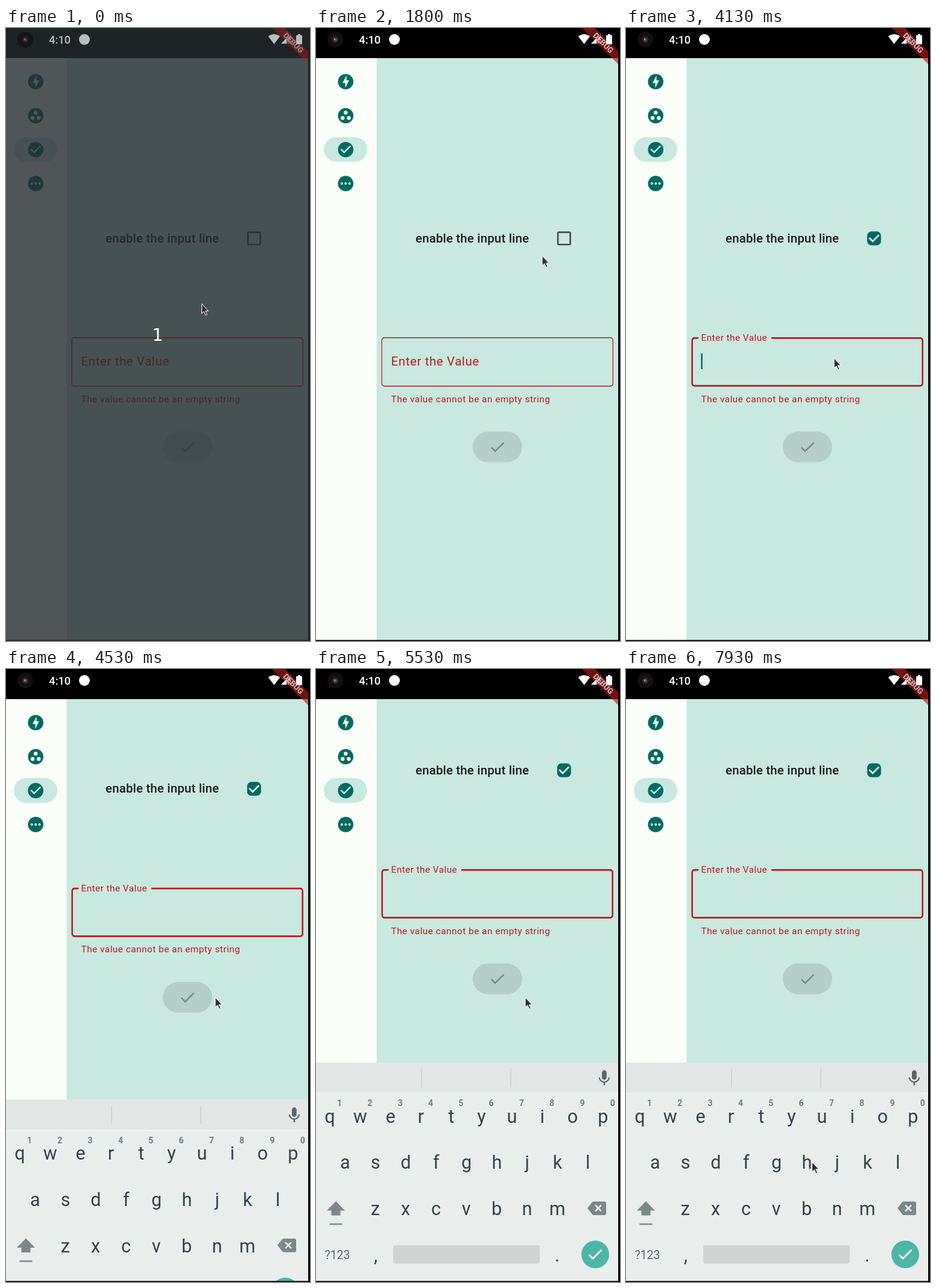
An HTML page for the animation above (8 s loop, 504x1017 px).

```html
<!DOCTYPE html>
<html lang="en">
<head>
<meta charset="utf-8">
<title>Input form demo</title>
<style>
  html, body { margin: 0; width: 100%; height: 100%; overflow: hidden; background: #000; }
  svg { display: block; width: 504px; height: 1017px; font-family: Roboto, sans-serif; }
  .red { fill: #ba1a1a; }
  .teal { fill: #006a60; }
  .mint { fill: #c9e8e0; }
  .rail { fill: #fafef9; }
  .small { font-size: 15.3px; letter-spacing: .51px; }
  .key { font-size: 30.5px; fill: #33434a; text-anchor: middle; }
  .hint { font-size: 14px; font-weight: 700; fill: #727d80; text-anchor: middle; }
  .grey { fill: #7b8789; }
</style>
</head>
<body>
<svg viewBox="0 0 504 1017">
  <defs>
    <path id="tick" d="M9 16.17 4.83 12l-1.42 1.41L9 19 21 7l-1.41-1.41z"/>
  </defs>

  <rect width="504" height="1017"/>
  <rect class="mint" x="100" y="50" width="401" height="966"/>
  <rect class="rail" y="50" width="100.5" height="966"/>

  <!-- navigation rail -->
  <rect class="mint" x="13" y="181" width="72" height="41" rx="20.5"/>
  <g class="teal">
    <circle cx="49.2" cy="89" r="12.8"/>
    <circle cx="49.2" cy="145.5" r="12.8"/>
    <circle cx="49.2" cy="201.7" r="12.8"/>
    <circle cx="49.2" cy="258" r="12.8"/>
  </g>
  <g class="rail">
    <path transform="translate(33.9 73.7) scale(1.276)" d="M11.48 20v-6.26H8L13 4v6.26h3.35z"/>
    <circle cx="49.2" cy="140.4" r="3.2"/>
    <circle cx="44.1" cy="149.3" r="3.2"/>
    <circle cx="54.3" cy="149.3" r="3.2"/>
    <circle cx="42.8" cy="258" r="1.9"/>
    <circle cx="49.2" cy="258" r="1.9"/>
    <circle cx="55.6" cy="258" r="1.9"/>
  </g>
  <path class="mint" transform="translate(33.9 186.4) scale(1.276)" d="M10 17 5 12l1.41-1.41L10 14.17l7.59-7.59L19 8z"/>

  <!-- form -->
  <g id="form">
    <text x="165" y="355.5" font-size="20.4" font-weight="500" letter-spacing=".19" fill="#191c1b">enable the input line</text>
    <rect id="box" rx="1.2"/>
    <path id="boxTick" d="M403.2 348.1 409 353.9 419.3 343.5" pathLength="1" stroke-dasharray="1 2" fill="none" stroke="#fff" stroke-width="2.55"/>
    <path id="border" fill="none" stroke="#ba1a1a"/>
    <text id="label" class="red" font-size="20.4" letter-spacing=".64">Enter the Value</text>
    <rect id="caret" class="teal" x="124.4" y="540" width="2.5" height="26"/>
    <text class="red small" x="124.5" y="620.7">The value cannot be an empty string</text>
    <g fill="#191c1b">
      <rect x="259.8" y="669.5" width="82" height="51" rx="25.5" opacity=".12"/>
      <use href="#tick" transform="translate(285.6 679.7) scale(1.276)" opacity=".38"/>
    </g>
  </g>

  <!-- on-screen keyboard, drawn at its resting place -->
  <g id="keyboard">
    <rect y="653" width="501" height="364" fill="#e9eeed"/>
    <rect y="653" width="501" height="50.5" fill="#e2e6e5"/>
    <rect y="703" width="501" height="1.5" fill="#f3f6f5"/>
    <path d="M175 663v31M323 663v31" stroke="#c8cdcc" stroke-width="1.3"/>
    <path transform="translate(462.3 663.2) scale(1.3)" fill="#5a6669" d="M12 14c1.66 0 3-1.34 3-3V5c0-1.66-1.34-3-3-3S9 3.34 9 5v6c0 1.66 1.34 3 3 3zm5.3-3c0 3-2.54 5.1-5.3 5.1S6.7 14 6.7 11H5c0 3.41 2.72 6.23 6 6.72V21h2v-3.28c3.28-.48 6-3.3 6-6.72z"/>
    <g id="keys"></g>
    <path class="grey" d="M33 883 48 898.5H40.5V906.5H25.5V898.5H18ZM22.5 919.8h21v2.4h-21z"/>
    <path class="grey" d="M450 894.5 458 884.5Q459 883.5 460.5 883.5H478.5Q481 883.5 481 886V903.5Q481 906 478.5 906H460.5Q459 906 458 904.8Z"/>
    <path d="m463 889.5 10 10m0-10-10 10" stroke="#e9eeed" stroke-width="2.5"/>
    <text x="35.5" y="979" font-size="19.5" text-anchor="middle" fill="#5c696d">?123</text>
    <rect x="128" y="956" width="243" height="30.5" rx="4" fill="#d0d5d4"/>
    <circle cx="463" cy="971.3" r="23" fill="#4db6a8"/>
    <use href="#tick" transform="translate(447.4 955.7) scale(1.276)" fill="#fff"/>
  </g>

  <rect x="501" width="3" height="1017"/>
  <rect y="1015.3" width="504" height="1.7"/>

  <rect id="dim" width="504" height="1017" fill="#262c30" opacity=".8"/>

  <!-- status bar -->
  <g id="status">
    <svg width="501" height="100">
      <g transform="translate(501 0) rotate(45)">
        <rect x="-60" y="27.2" width="120" height="15.3" fill="#b71c1c" opacity=".63"/>
        <text y="39.4" text-anchor="middle" font-size="13" font-weight="700" fill="#d3bebe">DEBUG</text>
      </g>
    </svg>
    <circle cx="32" cy="19" r="13" fill="#101010"/>
    <circle cx="32" cy="19" r="5.5" fill="#2b2525"/>
    <circle cx="32" cy="19.5" r="2.8" fill="#6d4a48"/>
    <circle cx="31" cy="18.5" r="1.1" fill="#c8bcbc"/>
    <g fill="#fff">
      <text x="71.3" y="26" font-size="18.2" font-weight="500">4:10</text>
      <circle cx="130" cy="19" r="9"/>
      <path d="M434.8 14Q444.5 6.5 454.2 14L444.5 26.5Z"/>
      <path d="M472 10V26H456Z" opacity=".3"/>
      <path d="M465 17V26H456Z"/>
      <path d="M484 10h4v2h2.2q.8 0 .8.8V26.2q0 .8-.8.8h-8.4q-.8 0-.8-.8V12.8q0-.8.8-.8H484z"/>
    </g>
  </g>

  <text id="count" x="251.5" y="519" font-size="28.8" text-anchor="middle" fill="#fff" style="font-family:'DejaVu Sans',sans-serif">1</text>

  <path id="pointer" d="M.5 0V16.2L4.2 12.8 7.2 19.2 9.6 18.1 6.7 11.9H11.6Z" fill="#2e2e2e" stroke="#fff" stroke-width="1"/>
</svg>

<script>
const LOOP = 8000, FPS = 15, KEYBOARD_HEIGHT = 362;
const $ = id => document.getElementById(id);

// time, x, y of the pointer tip
const POINTER = [
  [200, 324, 457.5], [330, 319, 473], [530, 302, 528], [730, 295, 547],
  [1330, 295, 547], [1530, 319, 487], [1800, 374.5, 378], [2000, 403, 345], [2130, 409, 338],
  [2930, 409, 338], [3130, 394, 390], [3400, 357, 500], [3600, 343, 546], [3730, 344.5, 548],
  [4400, 344.5, 548], [4470, 346, 546], [4530, 346.5, 545],
  [6400, 346.5, 545], [6600, 325, 605], [6870, 220, 775], [7070, 125, 895], [7270, 85, 940],
  [7400, 125, 925], [7600, 265, 850], [7730, 330, 805], [7930, 308, 818]
];
// time, share of the finished state
const SLIDE = [[0, 0], [4470, .36], [4530, .83], [4600, .955], [4670, .993], [4730, 1]];
const CHECK = [[0, 0], [2470, .3], [2530, .75], [2600, 1]];
const FLOAT = [[0, 0], [4070, .75], [4130, 1]];

const step = (table, t) => table.filter(row => row[0] <= t).pop()[1];
const mix = (a, b, p) => a + (b - a) * p;

function pointerAt(t) {
  const i = POINTER.findIndex(row => row[0] > t);
  if (i === 0) return POINTER[0].slice(1);
  if (i < 0) return POINTER[POINTER.length - 1].slice(1);
  const a = POINTER[i - 1], b = POINTER[i], p = (t - a[0]) / (b[0] - a[0]);
  return [mix(a[1], b[1], p), mix(a[2], b[2], p)];
}

function setAttrs(id, attrs) {
  for (const name in attrs) $(id).setAttribute(name, attrs[name]);
}

function buildKeys() {
  const pitch = 50.3;
  const text = (cls, x, y, s) => `<text class="${cls}" x="${x}" y="${y}">${s}</text>`;
  const row = (chars, x, y, cls = 'key') =>
    [...chars].map((c, i) => text(cls, x + i * pitch, y, c)).join('');
  $('keys').innerHTML =
    row('1234567890', 39, 725, 'hint') +
    row('qwertyuiop', 23, 752.5) +
    row('asdfghjkl', 48.3, 829) +
    row('zxcvbnm', 98.3, 906) +
    text('key', 99, 982.5, ',') + text('key', 400, 982.5, '.');
}

// Rounded outline whose stroke lies inside the field, open on top for the label
function outline(width, gap) {
  const d = width / 2, r = 5.1 - d;
  const l = 108.4 + d, t = 513.1 + d, R = 492.9 - d, b = 594.9 - d;
  const arc = (x, y) => `A${r} ${r} 0 0 1 ${x} ${y}`;
  return `M${120.3 + gap} ${t}H${R - r}${arc(R, t + r)}V${b - r}${arc(R - r, b)}` +
    `H${l + r}${arc(l, b - r)}V${t + r}${arc(l + r, t)}H120.3`;
}

function drawCheckbox(p) {
  const fill = Math.min(1, p * 2);
  const w = mix(2.55, 11.5, fill);
  setAttrs('box', {
    x: 399.8 + w / 2, y: 337.6 + w / 2, width: 23 - w, height: 23 - w,
    fill: fill === 1 ? '#006a60' : 'none',
    stroke: p > 0 ? '#006a60' : '#3f4947', 'stroke-width': w
  });
  const drawn = Math.max(0, p * 2 - 1);
  setAttrs('boxTick', { 'stroke-dashoffset': 1 - drawn, visibility: drawn ? 'visible' : 'hidden' });
}

function drawField(t) {
  const p = step(FLOAT, t), width = p ? 2.55 : 1.276;
  setAttrs('border', { d: outline(width, 120.7 * p), 'stroke-width': width });
  setAttrs('label', { transform: `translate(124.5 ${mix(560.3, 519, p)}) scale(${mix(1, .75, p)})` });
  const blink = t >= 4100 && Math.floor(t / 500) % 2 === 0;
  setAttrs('caret', { visibility: blink ? 'visible' : 'hidden' });
}

function draw(now) {
  const tick = Math.floor((now % LOOP + 5) * FPS / 1000) % (LOOP * FPS / 1000);
  const t = Math.round(tick * 100 / FPS) * 10;
  const shown = KEYBOARD_HEIGHT * step(SLIDE, t);
  const intro = t < 70 ? 'visible' : 'hidden';
  const [x, y] = pointerAt(t);

  drawCheckbox(step(CHECK, t));
  drawField(t);
  setAttrs('form', { transform: `translate(0 ${-shown / 2})` });
  setAttrs('keyboard', {
    transform: `translate(0 ${KEYBOARD_HEIGHT - shown})`,
    visibility: shown ? 'visible' : 'hidden'
  });
  setAttrs('dim', { visibility: intro });
  setAttrs('count', { visibility: intro });
  setAttrs('status', { opacity: t < 70 ? .7 : 1 });
  setAttrs('pointer', { transform: `translate(${x} ${y})` });
}

buildKeys();
const start = performance.now();
function loop() {
  draw(performance.now() - start);
  requestAnimationFrame(loop);
}
loop();
</script>
</body>
</html>
```
